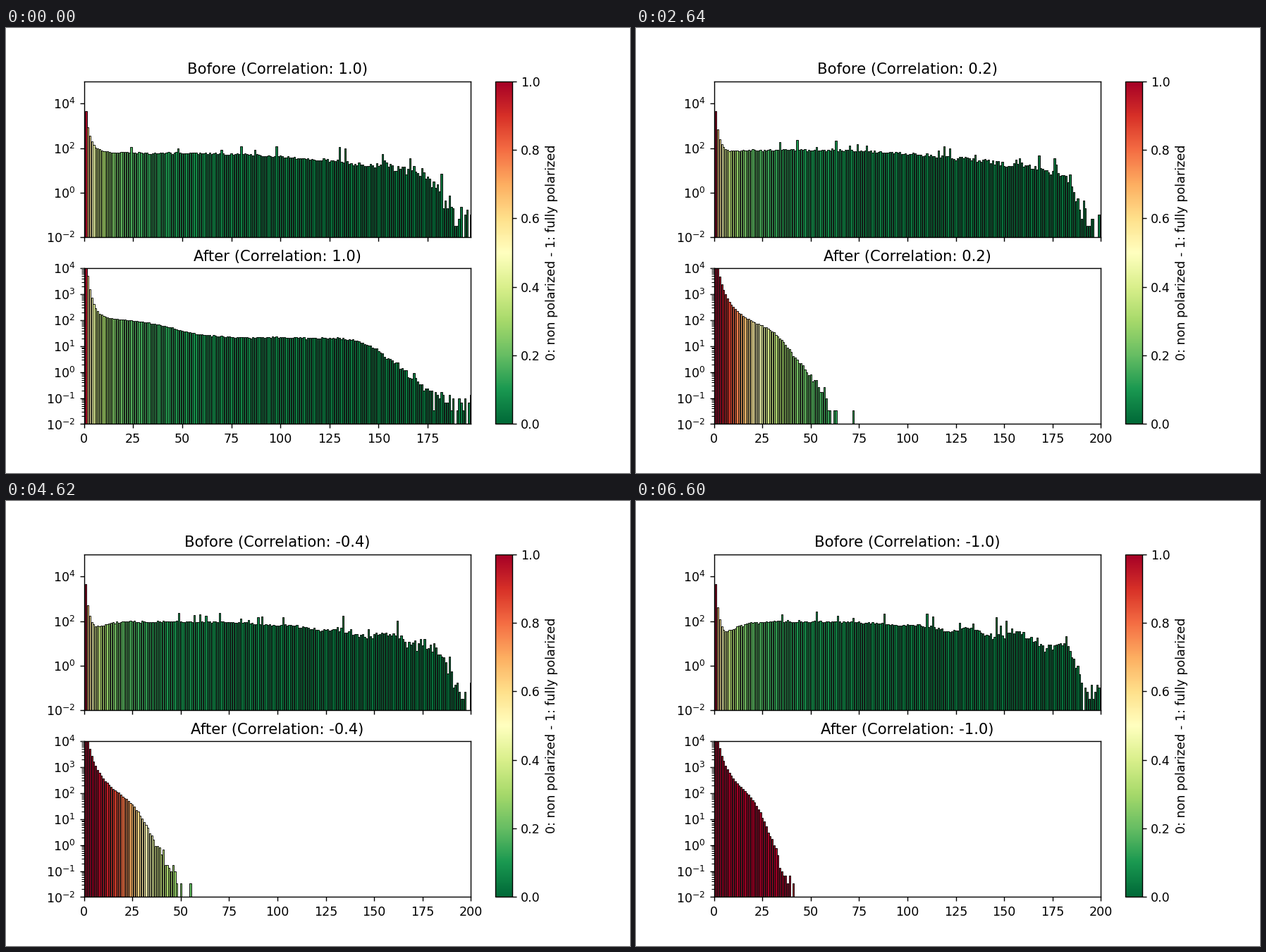
These frames come from a looping animation (885x632 px, 7260 ms). A matplotlib script:

```python
import numpy as np
import matplotlib.pyplot as plt
from matplotlib.animation import FuncAnimation
from matplotlib.ticker import LogLocator, MultipleLocator, NullFormatter, NullLocator

DPI = 126.4
W, H = 885, 632
RUNS = 30              # heights are averages over this many runs
CMAP = plt.get_cmap("RdYlGn_r")
CORR = [round(1 - k / 5, 1) for k in range(11)]
X_MAX = [197, 200, 198, 198, 200, 197, 195, 200, 198, 196, 200]
X = np.arange(1, 201)


def soft_ramp(x, width):
    """Zero on the left, slope one on the right, with a rounded bend."""
    return width * np.logaddexp(0, x / width)


def add_logs(a, b):
    return np.log10(10 ** a + 10 ** b)


def sample(logs, rng):
    return rng.poisson(RUNS * 10 ** logs) / RUNS


def before(u, n, rng):
    """Steep head, flat plateau, ragged fall near the last bar."""
    head = 3.66 - (2.5 + u) * np.log10(X)
    body = 1.78 + 0.2 * min(1, 1.7 * u) - 0.75 * u**2 * np.exp(-(X / 11) ** 2)
    body -= 0.6 * (np.maximum(X - 60, 0) / 90) ** 1.6
    body -= 0.5 * (np.maximum(X - n + 30, 0) / 12) ** 2
    late = np.maximum(X - 85, 0) / 100
    body += 0.25 * u * late * np.sin(X / 4)
    body = np.maximum(body, -1.2)
    body += rng.normal(0, 1, X.size) * (0.025 + 0.13 * late**2)
    spots = rng.integers(20, n - 10, 14)
    body[spots] += rng.uniform(0.15, 0.5, 14) * (1 + late[spots])
    return sample(add_logs(head, body), rng)


def after(u, rng):
    """Power-law head and shoulder, cut off earlier as u grows."""
    head = 4.78 - 0.17 * np.exp(-10 * u) - (2.2 + 0.8 * np.exp(-5 * u)) * np.log10(X)
    if u == 0:
        body = 1.33 + 0.7 / (1 + np.exp((X - 46) / 9))
        cut = 0.06 * soft_ramp(X - 142.0, 5)
        rest = -1.5
    else:
        body = 2.02 - 2 * u**1.5
        cut = (0.055 + 0.1 * u) * soft_ramp(X - 37.5 + 16 * u, 4 - 1.5 * u)
        rest = -1.1 - 1.2 * max(0, 10 * u - 1) ** 0.4
    h = sample(add_logs(add_logs(head, body) - cut, rest), rng)
    h[0] = 1e5
    return h


def shade(x0, power):
    tone = 1 / (1 + (X / x0) ** power)
    tone[0] = 1
    return tone


def shade_after(u):
    return shade((3.5 + 38 * u**0.75) / (1.0001 - u**16), 0.8 + 2.7 * u)


def draw_bars(ax, h, tone, n):
    for p in list(ax.patches):
        p.remove()
    on = (h > 0) & (X <= n)
    floor = 1e-3
    ax.bar(X[on], h[on] - floor, bottom=floor, color=CMAP(tone[on]),
           edgecolor="black", linewidth=0.5)


fig, (top, low) = plt.subplots(2, 1, sharex=True, dpi=DPI,
                               figsize=((W + 1e-6) / DPI, (H + 1e-6) / DPI))
top.set_yscale("log")
low.set_yscale("log")
top.set_yticks([1e-2, 1, 1e2, 1e4])
top.yaxis.set_minor_locator(NullLocator())
low.set_yticks([10.0 ** e for e in range(-2, 5)])
low.yaxis.set_minor_locator(LogLocator(subs=range(2, 10), numticks=99))
low.yaxis.set_minor_formatter(NullFormatter())
low.xaxis.set_major_locator(MultipleLocator(25))
fig.colorbar(plt.cm.ScalarMappable(plt.Normalize(0, 1), CMAP), ax=[top, low],
             label="0: non polarized - 1: fully polarized")


def update(k):
    c, n = CORR[k], X_MAX[k]
    u = (1 - c) / 2
    rng = np.random.default_rng(40 + k)
    draw_bars(top, before(u, n, rng), shade(4, 0.9), n)
    draw_bars(low, after(u, rng), shade_after(u), n)
    top.set_title(f"Bofore (Correlation: {c:.1f})")
    low.set_title(f"After (Correlation: {c:.1f})")
    top.set_ylim(1e-2, 1e5)
    low.set_ylim(1e-2, 1e4)
    low.set_xlim(0, n)


anim = FuncAnimation(fig, update, frames=len(CORR), interval=660, repeat=True)
plt.show()
```
